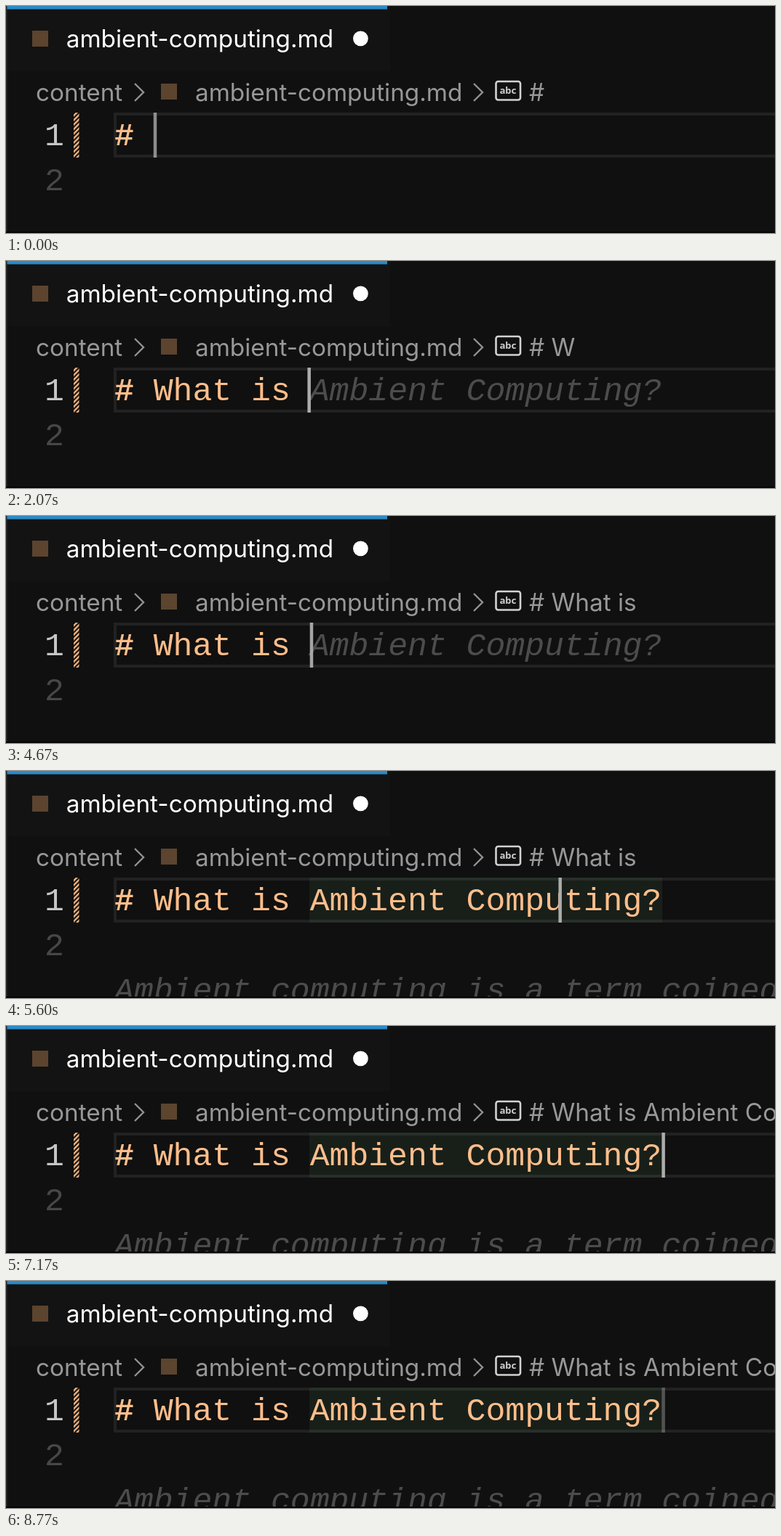
An HTML page that plays this animation: 1057x313 px, repeating every 8.8 s.

```html
<!DOCTYPE html>
<html lang="en">
<head>
<meta charset="utf-8">
<title>Editor completion</title>
<style>
  html, body { margin: 0; width: 100%; height: 100%; overflow: hidden; background: #101010; }
  svg { display: block; width: 1057px; height: 313px; }
  text { white-space: pre; }
  .ui { font: 33.3px Inter, "Open Sans", sans-serif; fill: #989898; }
  .code { font: 44.78px "Liberation Mono", "Noto Sans Mono", monospace; fill: #fdbe8b; }
  .mark { font-weight: bold; }
  .ghost { font-style: italic; fill: #4c4c4c; }
</style>
</head>
<body>
<svg viewBox="0 0 1057 313" xmlns="http://www.w3.org/2000/svg">
  <defs>
    <pattern id="hatch" width="4.4" height="4.4" patternUnits="userSpaceOnUse" patternTransform="rotate(-45)">
      <rect width="4.4" height="2.3" fill="#f3b988"/>
    </pattern>
  </defs>
  <rect width="1057" height="313" fill="#101010"/>

  <!-- tab -->
  <rect width="528" height="90" fill="#131313"/>
  <rect width="524" height="4.5" fill="#2b8ac6"/>
  <rect x="36" y="34" width="22" height="22" fill="#5c442f"/>
  <text class="ui" x="82.7" y="57" style="fill:#fff">ambient-computing.md</text>
  <circle cx="487.4" cy="44.8" r="10.4" fill="#fff"/>

  <!-- breadcrumbs -->
  <text class="ui" x="41" y="131">content</text>
  <rect x="213" y="107" width="22" height="22" fill="#5c442f"/>
  <text class="ui" x="260" y="131">ambient-computing.md</text>
  <path d="M177 107l12 12-12 12M643 107l12 12-12 12" fill="none" stroke="#929292" stroke-width="2.4"/>
  <rect x="673.5" y="104" width="33.5" height="25.5" rx="3" fill="none" stroke="#d2d2d2" stroke-width="2.6"/>
  <text x="678.6" y="121" fill="#d2d2d2" style="font:bold 13px 'Noto Sans Mono','DejaVu Sans Mono',monospace">abc</text>
  <text class="ui" id="crumb" x="719" y="131"></text>

  <!-- editor -->
  <rect x="150" y="149" width="920" height="58" fill="none" stroke="#222" stroke-width="4"/>
  <rect x="93" y="147" width="7.5" height="62" fill="#17130f"/>
  <rect x="93" y="147" width="7.5" height="62" fill="url(#hatch)"/>
  <text class="code" x="53" y="192" style="fill:#c6c6c6">1</text>
  <text class="code" x="53" y="254" style="fill:#474747">2</text>
  <rect id="accepted" x="417" y="147" width="485" height="62" fill="#508255" fill-opacity=".13"/>
  <text class="code" x="149" y="192"><tspan class="mark">#</tspan><tspan id="typed"></tspan></text>
  <text class="code ghost" id="hint" y="192"></text>
  <text class="code ghost" id="next" x="149" y="316">Ambient computing is a term coined by</text>
  <rect id="caret" y="147" width="4.5" height="62" fill="#acacac"/>

  <rect width="1.5" height="313" fill="#292929"/>
  <rect y="311" width="1057" height="2" fill="#050505"/>
</svg>
<script>
const LOOP = 8800, STEP = 100 / 3;
const LEFT = 149, PITCH = 26.87;
const LINE = '# What is Ambient Computing?';
const HINT_AT = 1625, ACCEPT_AT = 5568;

// [time, number of characters in the line or crumb]
const KEYS = [[0, 2], [950, 3], [1310, 4], [1345, 5], [1375, 6], [1400, 7],
  [1765, 8], [1870, 9], [2020, 10], [ACCEPT_AT, LINE.length]];
const CRUMBS = [[0, 1], [1290, 3], [2220, 6], [2360, 9], [5920, LINE.length]];
// [start, end, phase origin] of each stretch where the caret pulses
const PULSES = [[0, 950, 200 - 1000], [2520, ACCEPT_AT, 2520], [6060, LOOP, 6060]];

const el = id => document.getElementById(id);
const [crumb, accepted, typed, hint, next, caret] =
  ['crumb', 'accepted', 'typed', 'hint', 'next', 'caret'].map(el);
const clamp = x => Math.min(1, Math.max(0, x));
const show = (node, on) => node.setAttribute('visibility', on ? 'visible' : 'hidden');
const lastIndex = (list, t) => list.filter(([start]) => start <= t).length - 1;

// The caret glides for 80 ms from wherever it was when a key arrived.
function caretColumn(i, t) {
  const [start, col] = KEYS[i];
  if (i === 0) return col;
  const p = clamp((t - start) / 80);
  if (p === 1) return col;
  const from = caretColumn(i - 1, start);
  return from + (col - from) * (1 - Math.pow(1 - p, 2.4));
}

function caretOpacity(t) {
  const pulse = PULSES.find(([start, end]) => t >= start && t < end);
  if (!pulse) return 1;
  const phase = (t - pulse[2]) % 1000;
  const p = clamp(((phase < 500 ? phase : 1000 - phase) - 100) / 350);
  return 1 - p * p * (3 - 2 * p);
}

function draw(t) {
  const i = lastIndex(KEYS, t), n = KEYS[i][1], done = t >= ACCEPT_AT;
  typed.textContent = LINE.slice(1, n);
  hint.textContent = t >= HINT_AT ? LINE.slice(n) : '';
  hint.setAttribute('x', LEFT + n * PITCH);
  crumb.textContent = LINE.slice(0, CRUMBS[lastIndex(CRUMBS, t)][1]);
  show(accepted, done);
  show(next, done);
  caret.setAttribute('x', LEFT + caretColumn(i, t) * PITCH);
  caret.setAttribute('opacity', caretOpacity(t));
}

// The picture advances thirty times a second.
const origin = performance.now();
function tick() {
  const t = Math.max(0, performance.now() - origin) % LOOP;
  draw(Math.floor((t + 4) / STEP) * STEP % LOOP);
  requestAnimationFrame(tick);
}
tick();
</script>
</body>
</html>
```
